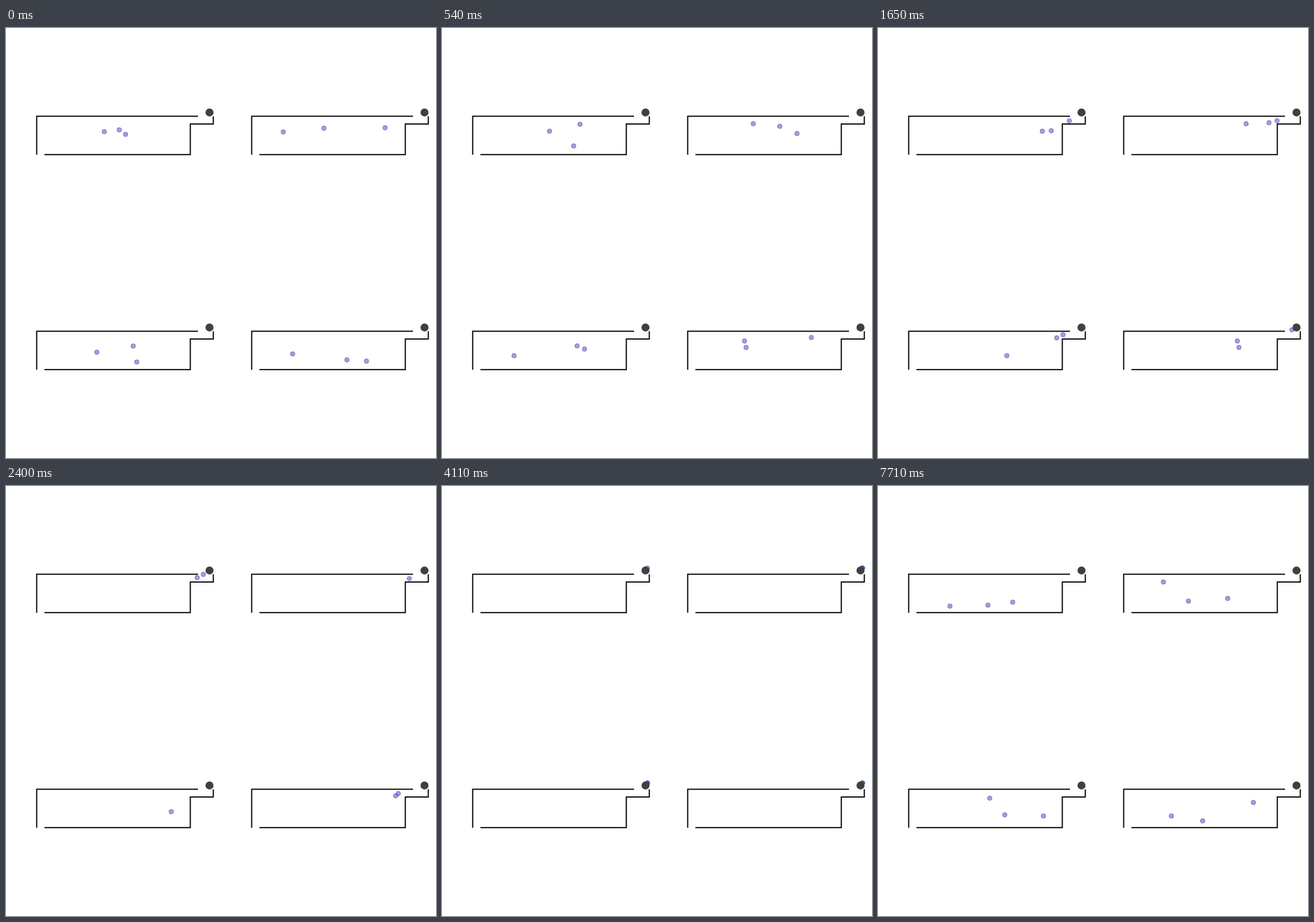
An HTML page with a canvas that plays this animation: 748 px wide and 748 px high, repeating every 7.74 s.

```html
<!DOCTYPE html>
<html lang="en">
<head>
<meta charset="utf-8">
<title>Four rooms</title>
<style>
  html, body { margin: 0; width: 100%; height: 100%; overflow: hidden; background: #fff; }
  canvas { display: block; width: 748px; height: 748px; }
</style>
</head>
<body>
<canvas id="stage" width="748" height="748"></canvas>
<script>
const ctx = document.getElementById('stage').getContext('2d');
const TICK = 30, TICKS = 258, PANEL = 374;
const STEP = 2.671;            // pixels per tick, measured along x plus y
const REF = 18;                // tick at which each walker is at its listed x, y
const GOAL = [354, 146.5], RIM = [357.6, 143.1];

// Resting layouts of the four rooms, shown for one tick each
const before = [
  [[171, 180.3], [197, 177.2], [208, 185]],
  [[108.3, 180.8], [179, 174.3], [285.4, 173.5]],
  [[158, 190], [221.3, 179.2], [227.5, 207]],
  [[124.5, 193], [219, 203.3], [253, 205.4]]
];
const after = [
  [[125.2, 209], [191.2, 207.2], [234.3, 202]],
  [[122.5, 167], [166, 200.3], [234.3, 195.5]],
  [[194.4, 169], [220.5, 198], [287.8, 200]],
  [[136.3, 200], [190.7, 208.5], [279, 176.5]]
];

// x, y, x where the climb begins, corridor y, tick of moving to the rim, wait
const walkers = [
  [[187, 179.5, 300, 159.5, 102], [240, 167.5, 312, 161.5, 166], [229, 205.2, 274.8, 160, 999]],
  [[167.5, 166.5, 310, 161, 112], [213.5, 171, 300, 161, 92], [243.5, 183.5, 298, 161, 84]],
  [[125.3, 196, 284, 160, 90], [235, 179, 297, 160, 96, 9], [248, 184.5, 295, 159.5, 86]],
  [[152.2, 170.4, 299, 160.5, 104], [155, 181.7, 287, 160, 110], [268.5, 164.4, 316, 160, 88, 8]]
];

const gap = (a, b) => Math.abs(a[0] - b[0]) + Math.abs(a[1] - b[1]);
const mix = (a, b, k) => [a[0] + (b[0] - a[0]) * k, a[1] + (b[1] - a[1]) * k];

function along(points, dist) {
  for (let i = 1; i < points.length; i++) {
    const len = gap(points[i - 1], points[i]);
    if (dist < len) return mix(points[i - 1], points[i], dist / len);
    dist -= len;
  }
  return points[points.length - 1];
}

function place([x, y, bend, lane, leave, wait = 0], tick) {
  let dist = STEP * (tick - REF);
  if (dist < 0) return [x + dist, y];
  const toBend = bend - x;
  if (dist > toBend) dist = Math.max(toBend, dist - wait);
  const path = [
    [x, y], [bend, y], [bend + y - lane, lane],
    [497 - lane, lane], [350.5, GOAL[1]], GOAL
  ];
  const total = path.slice(1).reduce((sum, p, i) => sum + gap(path[i], p), 0);
  if (dist < total) return along(path, dist);
  const arrival = REF + (total + wait) / STEP;
  const k = Math.min(1, Math.max(0, (tick - Math.max(leave, arrival)) / 3));
  const spot = mix(GOAL, RIM, k);
  const sway = k === 1 && tick % 2 ? 0.3 : 0;
  return [spot[0] - sway, spot[1] - sway];
}

function disc([x, y], r) {
  ctx.beginPath();
  ctx.arc(x, y, r, 0, Math.PI * 2);
  ctx.fill();
}

function walls() {
  ctx.strokeStyle = '#000';
  ctx.lineWidth = 2;
  ctx.beginPath();
  ctx.moveTo(53.4, 220.4);
  ctx.lineTo(53.4, 153.5);
  ctx.lineTo(334, 153.5);
  ctx.moveTo(66.8, 220.3);
  ctx.lineTo(320.6, 220.3);
  ctx.lineTo(320.6, 166.9);
  ctx.lineTo(360.6, 166.9);
  ctx.lineTo(360.6, 153.5);
  ctx.stroke();
}

function room(spots) {
  walls();
  for (const spot of spots) {
    ctx.fillStyle = 'rgba(64,64,192,.5)';
    disc(spot, 4);
    ctx.strokeStyle = 'rgba(56,56,150,.5)';
    ctx.lineWidth = 1;
    ctx.stroke();
  }
  ctx.fillStyle = '#404040';
  disc([354, 146.9], 7);
}

function draw(tick) {
  ctx.fillStyle = '#fff';
  ctx.fillRect(0, 0, 748, 748);
  for (let i = 0; i < 4; i++) {
    ctx.save();
    ctx.translate((i % 2) * PANEL, (i >> 1) * PANEL);
    if (tick === 0) room(before[i]);
    else if (tick === TICKS - 1) room(after[i]);
    else room(walkers[i].map(w => place(w, tick)));
    ctx.restore();
  }
}

const start = performance.now();
function loop() {
  const elapsed = Math.max(0, performance.now() - start);
  draw(Math.floor(elapsed / TICK) % TICKS);
  requestAnimationFrame(loop);
}
loop();
</script>
</body>
</html>
```
